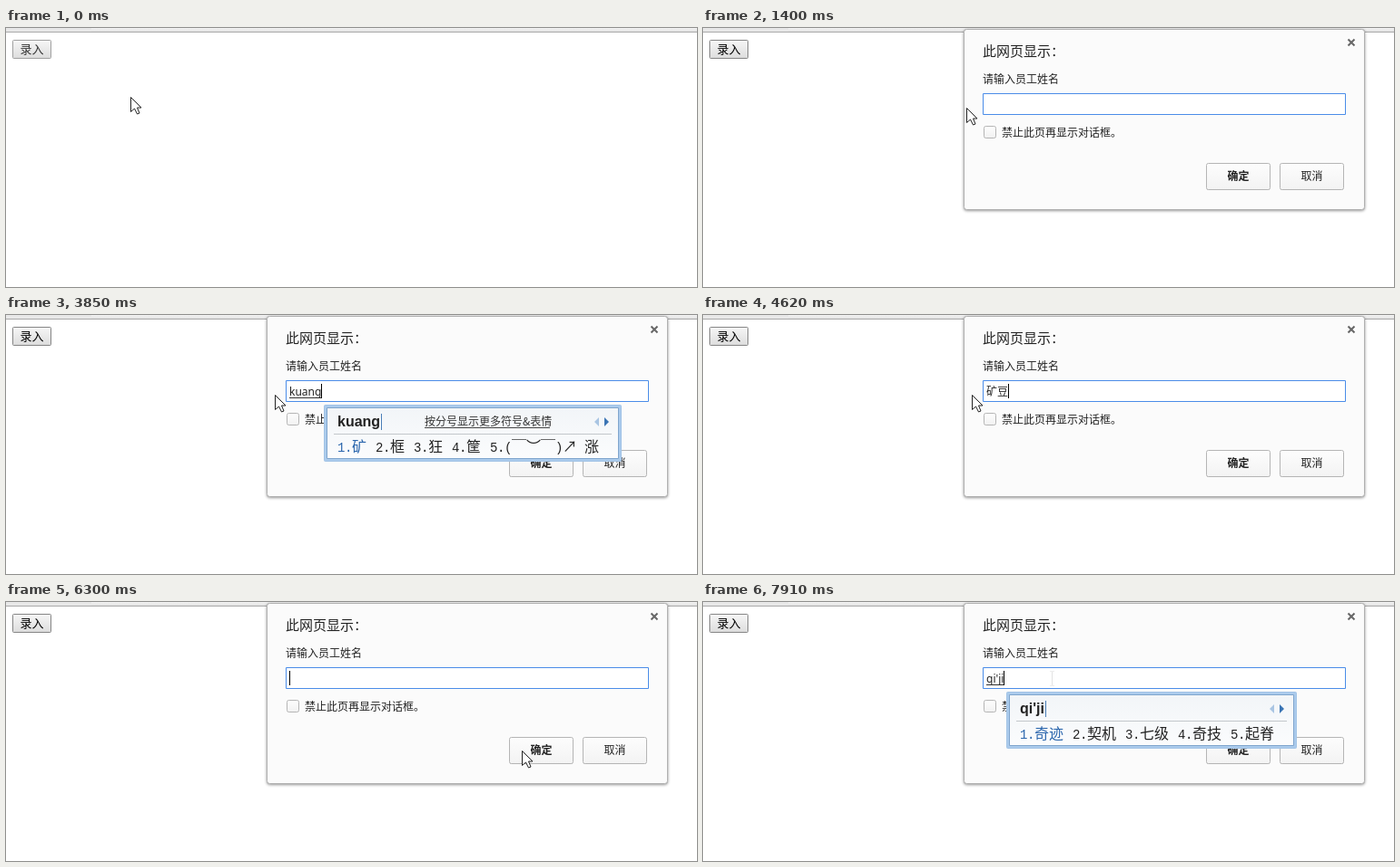
Recreate the animation shown at these times as an HTML page with a canvas. Size 761 by 286 pixels, loop 8 s.

```html
<!DOCTYPE html>
<html lang="zh-CN">
<head>
<meta charset="utf-8">
<style>
html, body { margin: 0; width: 100%; height: 100%; overflow: hidden; background: #fff; }
canvas { display: block; }
</style>
</head>
<body>
<canvas id="stage" width="761" height="286"></canvas>
<script>
const ctx = document.getElementById('stage').getContext('2d');
const LOOP = 8000, STEP = 70;
const CJK = '"Noto Sans CJK SC", "Noto Sans CJK", sans-serif';
const INPUT_FONT = '12px "Noto Sans", ' + CJK;

// Arrow tip positions: time, x, y
const pointerPath = [
  [0, 137, 76], [560, 29, 23], [1190, 29, 23], [1260, 70, 38], [1330, 200, 72],
  [1400, 290, 88], [1540, 296, 88], [5180, 296, 88], [5600, 566, 156], [5740, 568, 164],
  [6370, 568, 164], [6720, 384, 84]
];

const dialogTimes = [[910, 6230], [6300, LOOP]];
const caretTimes = [[910, 1400], [1890, 2380], [2800, 5110], [5600, 6090], [6300, 6650], [7140, LOOP]];

// Input contents: start time, committed text, text being composed, candidates, hint shown
const single = ['矿', '框', '狂', '筐', '(￣︶￣)↗ 涨'];
const second = ['豆', '都', '斗', '抖', '逗'];
const pairs = ['奇迹', '契机', '七级', '奇技', '起脊'];
const entries = [
  [0, '', ''],
  [2940, '', 'k', ['看', '可', '快', '开', '口']],
  [3010, '', 'ku', ['苦', '哭', '库', '酷', '裤']],
  [3150, '', 'kua', ['夸', '跨', '垮', '挎', '胯']],
  [3220, '', 'kuan', ['宽', '款', '髋', '快安', '苦安']],
  [3430, '', 'kuang', single],
  [3850, '', 'kuang', single, true],
  [3920, '矿', ''],
  [4200, '矿', 'd', ['的', '都', '到', '多', '点']],
  [4340, '矿', 'do', ['都', '多', '动', '东', '懂']],
  [4410, '矿', 'dou', second],
  [4480, '矿', 'dou', second, true],
  [4620, '矿豆', ''],
  [6230, '', ''],
  [7560, '', 'q', ['去', '请', '前', '其', '起'], true],
  [7700, '', 'qi', ['起', '其', '七', '气', '期']],
  [7770, '', "qi'j", ['奇迹', '请假', '期间', '起劲', '前进']],
  [7910, '', "qi'ji", pairs]
];

const within = (t, ranges) => ranges.some(([a, b]) => t >= a && t < b);

function rect(x, y, w, h, color) {
  ctx.fillStyle = color;
  ctx.fillRect(x, y, w, h);
}

function box(x, y, w, h, fill, border, radius = 0) {
  ctx.beginPath();
  ctx.roundRect(x + .5, y + .5, w - 1, h - 1, radius);
  ctx.fillStyle = fill;
  ctx.fill();
  ctx.lineWidth = 1;
  ctx.strokeStyle = border;
  ctx.stroke();
}

function text(str, x, y, font, color = '#222', align = 'left') {
  ctx.font = font;
  ctx.fillStyle = color;
  ctx.textAlign = align;
  ctx.fillText(str, x, y);
}

function shape(points, fill, stroke) {
  ctx.beginPath();
  points.forEach(([x, y]) => ctx.lineTo(x, y));
  ctx.closePath();
  ctx.fillStyle = fill;
  ctx.fill();
  if (stroke) {
    ctx.lineWidth = 1;
    ctx.strokeStyle = stroke;
    ctx.stroke();
  }
}

function gradient(y0, y1, top, bottom) {
  const g = ctx.createLinearGradient(0, y0, 0, y1);
  g.addColorStop(0, top);
  g.addColorStop(1, bottom);
  return g;
}

function pointerAt(t) {
  const i = pointerPath.findIndex(p => p[0] > t);
  if (i < 0) return pointerPath.at(-1).slice(1);
  const [t0, x0, y0] = pointerPath[i - 1], [t1, x1, y1] = pointerPath[i];
  const k = (t - t0) / (t1 - t0);
  return [Math.round(x0 + (x1 - x0) * k), Math.round(y0 + (y1 - y0) * k)];
}

function drawPage(t) {
  rect(0, 0, 761, 286, '#fff');
  rect(0, 0, 94, 4, '#e8e8e8');
  rect(94, 0, 667, 4, gradient(0, 4, '#f3f3f3', '#e2e2e2'));
  rect(0, 4, 761, 1, '#a9a9a9');
  const pressed = t >= 840 && t < 910, hover = t >= 490;
  const face = pressed ? gradient(13, 34, '#ddd', '#eee') : gradient(13, 34, '#f7f7f7', '#dcdcdc');
  box(7, 13, 43, 21, face, hover ? '#858585' : '#a0a0a0', 1);
  text('录入', 28.5, 28, '13px ' + CJK, hover ? '#000' : '#333', 'center');
}

function dialogButton(label, x, weight, pressed) {
  rect(x + 1, 178, 69, 1, '#ddd');
  const face = pressed ? gradient(149, 178, '#eee', '#e2e2e2') : gradient(149, 178, '#fdfdfd', '#f3f3f3');
  box(x, 149, 71, 30, face, pressed ? '#888' : '#b5b5b5', 2);
  text(label, x + 35.5, 168, `${weight} 12px ${CJK}`, '#222', 'center');
}

function drawDialog(t) {
  ctx.save();
  ctx.shadowColor = 'rgba(0,0,0,.35)';
  ctx.shadowBlur = 3;
  ctx.shadowOffsetY = 1;
  box(287, 1, 442, 200, '#fbfbfb', '#b0b0b0', 3);
  ctx.restore();
  box(287, 1, 442, 200, '#fbfbfb', '#b0b0b0', 3);

  text('此网页显示：', 308, 31, '15px ' + CJK);
  text('请输入员工姓名', 308, 61, '12px ' + CJK);
  ctx.beginPath();
  for (const d of [-1, 1]) {
    ctx.moveTo(710.5, 16 - 3.5 * d);
    ctx.lineTo(717.5, 16 + 3.5 * d);
  }
  ctx.lineWidth = 2;
  ctx.strokeStyle = '#666';
  ctx.stroke();

  box(308, 72, 400, 24, '#fff', '#4a8ce8');
  box(309, 108, 14, 14, gradient(108, 122, '#fff', '#f0f0f0'), '#b5b5b5', 2);
  text('禁止此页再显示对话框。', 329, 120, '12px ' + CJK);
  dialogButton('确定', 554, 'bold', t >= 5880 && t < 6020);
  dialogButton('取消', 635, 'normal', false);
}

// Fixed grid: half-width characters take 8 px, full-width ones 16 px
const cell = ch => ch.charCodeAt(0) < 256 ? 8 : 16;
const gridWidth = str => [...str].reduce((sum, ch) => sum + cell(ch), 0);

function gridText(str, x, y, color) {
  for (const ch of str) {
    const w = cell(ch);
    text(ch, x, y, w === 8 ? '14px "Liberation Mono", monospace' : '16px ' + CJK, color);
    x += w;
  }
}

function drawCandidates(x, composing, words, hint) {
  const items = words.map((word, i) => `${i + 1}.${word}`);
  const content = items.reduce((sum, s) => sum + gridWidth(s) + 10, -10);
  const w = Math.max(318, content + 40), right = x + w;
  box(x, 99, w, 63, '#abcbec', '#a3c4e6', 1);
  box(x + 3, 102, w - 6, 57, gradient(102, 159, '#f2f5f8', '#fbfcfd'), '#7fa5cd');

  const bold = 'bold 16px "Liberation Sans", sans-serif';
  text(composing, x + 15, 123, bold);
  rect(Math.round(x + 16 + ctx.measureText(composing).width), 109, 1, 18, '#4b7fb8');
  if (hint) {
    text('按分号显示更多符号&表情', x + 111, 122, '12px ' + CJK, '#333');
    rect(x + 111, 124, 138, 1, '#444');
  }
  shape([[right - 25, 113], [right - 25, 123], [right - 30, 118]], '#a9c5e3');
  shape([[right - 19, 113], [right - 19, 123], [right - 14, 118]], '#3a74b4');
  rect(x + 11, 131, w - 22, 1, '#c3c7cb');

  let left = x + 15;
  items.forEach((item, i) => {
    gridText(item, left, 151, i ? '#222' : '#2b66ad');
    left += gridWidth(item) + 10;
  });
}

function drawInput(t) {
  const [, done, composing, words, hint] = entries.findLast(e => e[0] <= t);
  text(done + composing, 312, 89, INPUT_FONT);
  const start = 312 + ctx.measureText(done).width;
  const end = Math.round(start + ctx.measureText(composing).width);
  if (composing) rect(Math.round(start), 91, end - Math.round(start), 1, '#333');
  if (within(t, caretTimes)) rect(end, 76, 1, 16, '#000');
  return () => composing && drawCandidates(end + 3, composing, words, hint);
}

function drawPointer(t) {
  const [x, y] = pointerAt(t);
  if (t >= 6720) {
    rect(x, y - 7, 1, 16, '#e2e2e2');
    rect(x - 2, y - 8, 5, 1, '#ededed');
    rect(x - 2, y + 8, 5, 1, '#ededed');
    return;
  }
  const arrow = [[0, 0], [0, 16], [4, 12.5], [7, 18.5], [9.5, 17.5], [7, 11.5], [11.5, 11.5]];
  shape(arrow.map(([dx, dy]) => [x + dx + .5, y + dy + .5]), '#fff', '#222');
}

function draw(now) {
  const t = Math.floor(now % LOOP / STEP) * STEP;
  drawPage(t);
  let popup;
  if (within(t, dialogTimes)) {
    drawDialog(t);
    popup = drawInput(t);
  }
  drawPointer(t);
  if (popup) popup();
}

let origin;
function frame(now) {
  origin ??= now;
  draw(now - origin);
  requestAnimationFrame(frame);
}
requestAnimationFrame(frame);
</script>
</body>
</html>
```
